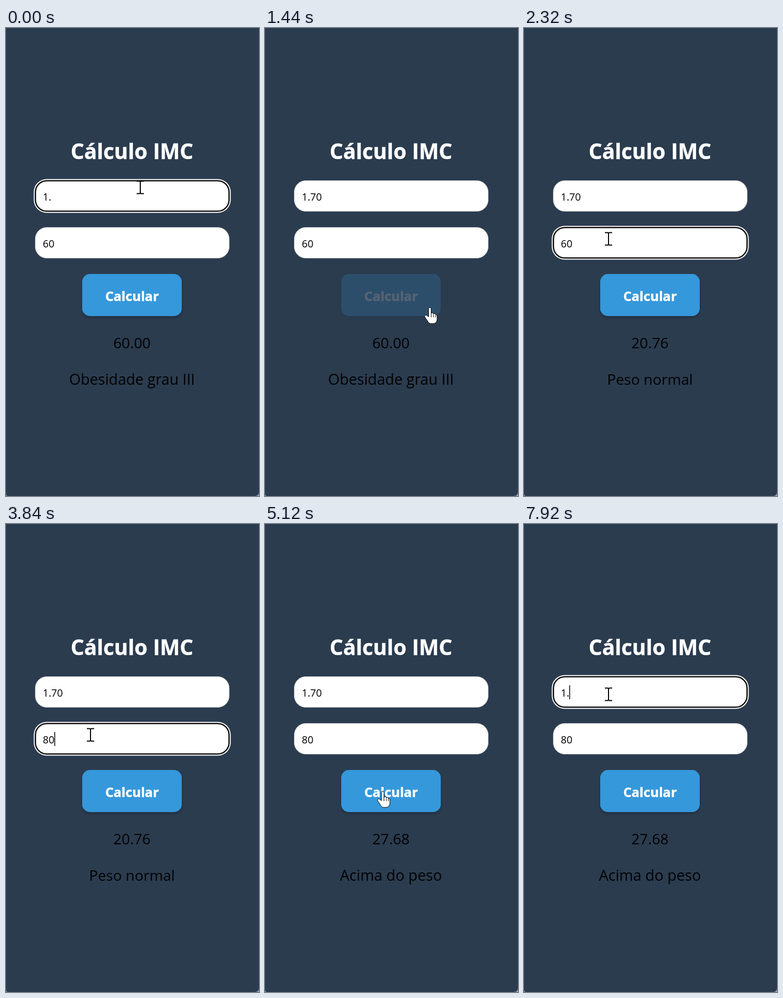
These frames come from a looping animation (488 px wide and 900 px high, 8000 ms). An HTML page:

```html
<!DOCTYPE html>
<html lang="pt">
<head>
<meta charset="utf-8">
<style>
  html, body { margin: 0; width: 100%; height: 100%; overflow: hidden; background: #2b3c4f; }
  svg { display: block; width: 100%; height: 100%; font-family: "Open Sans", "Noto Sans", sans-serif; }
  .mid { text-anchor: middle; }
  .bold { font-weight: 700; fill: #fff; stroke: #fff; stroke-width: .5; }
  .entry { font-size: 19.5px; }
  .pointer { fill: #fff; stroke: #000; stroke-linejoin: round; }
</style>
</head>
<body>
<svg viewBox="0 0 488 900">
  <defs>
    <filter id="shade" x="-10%" y="-20%" width="120%" height="140%">
      <feDropShadow dx="0" dy="3" stdDeviation="2.9" flood-opacity=".25"/>
    </filter>
    <g id="box">
      <rect x="56.5" y=".5" width="374" height="59" rx="22" fill="#fff" stroke="#ccc"/>
    </g>
  </defs>
  <path d="M488 892V900H480Q488 900 488 892ZM0 896V900H4Q0 900 0 896Z" fill="#a0a6ad"/>

  <text class="mid bold" x="243" y="252" font-size="40.7">Cálculo IMC</text>
  <use href="#box" y="293"/>
  <use href="#box" y="383"/>
  <g id="ring">
    <rect x="53.5" y="-2.5" width="380" height="65" rx="25" fill="#fff"/>
    <rect x="56.75" y=".75" width="373.5" height="58.5" rx="21.8" fill="#fff" stroke="#101010" stroke-width="2.6"/>
  </g>
  <text class="entry" id="height" x="71" y="332"></text>
  <text class="entry" id="weight" x="71" y="422"></text>
  <rect id="caret" width="1.5" height="27"/>

  <g id="button">
    <rect x="147" y="473" width="192" height="81" rx="15" fill="#3498db" filter="url(#shade)"/>
    <text class="mid bold" x="243" y="525" font-size="25.3">Calcular</text>
  </g>
  <text class="mid" id="value" x="243" y="616" font-size="28.2"></text>
  <text class="mid" id="label" x="243" y="686"></text>

  <g id="cursor">
    <path id="beam" d="M-7-11.5H-2Q0-11.5 0-9.5Q0-11.5 2-11.5H7M0-10V11M-7 12.5H-2Q0 12.5 0 10.5Q0 12.5 2 12.5H7" fill="none" stroke="#000" stroke-width="2"/>
    <g id="hand" class="pointer">
      <path d="M-2.5 18V2.5a2.5 2.5 0 0 1 5 0V12a2 2 0 0 1 4.5 1a2 2 0 0 1 4 1.5a1.8 1.8 0 0 1 3 1.5V22c0 5-3 9-8 9h-3c-4 0-6-2-8-6l-5-7c-1-2 2-4.5 4.5-2.5z"/>
      <path d="M2.5 12v7M7 14v5M11 15v4" fill="none"/>
    </g>
    <path id="arrow" class="pointer" d="M0 0V24L5.5 19L9 27L13 25.3L9.5 17.5H17Z"/>
  </g>
</svg>
<script>
const LOOP = 8000, BLINK = 500, DIM = 0.2;
const el = {};
document.querySelectorAll("[id]").forEach(node => el[node.id] = node);

// Each list holds [time, ...values]; the last entry reached applies.
const heights = [[0, "1."], [240, "1.7"], [480, "1.70"], [5760, "1.7"], [5840, "1."], [5920, "1"], [7600, "1."]];
const weights = [[0, "60"], [2800, "6"], [2960, ""], [3360, "8"], [3520, "80"]];
const focus = [[0, "height"], [1240, ""], [1960, "weight"], [4640, ""], [5680, "height"]];
const results = [
  [0, "60.00", "Obesidade grau III", 28.6],
  [1480, "20.76", "Peso normal", 28.2],
  [4800, "27.68", "Acima do peso", 28.8]
];
const presses = [[1240, 1480], [4640, 4800]];
const keys = [-560, 240, 480, 1800, 2800, 2960, 3360, 3520, 5680, 5760, 5840, 5920, 7600];

// Pointer moves: start, end, target x, target y
const moves = [
  [0, 0, 259, 306], [720, 1200, 318, 537.5], [1720, 1960, 163, 405],
  [4080, 4560, 227, 514], [5360, 5680, 163, 327]
];

const clamp = v => Math.min(1, Math.max(0, v));
const ease = v => v * v * (3 - 2 * v);
const at = (list, t) => list.filter(e => e[0] <= t).pop();
const show = (node, on) => node.setAttribute("visibility", on ? "visible" : "hidden");

function pointer(t) {
  let [, , x, y] = moves[0];
  for (const [start, end, tx, ty] of moves.slice(1)) {
    const k = ease(clamp((t - start) / (end - start)));
    x += (tx - x) * k;
    y += (ty - y) * k;
  }
  return [x, y];
}

function buttonOpacity(t) {
  let dim = 0;
  for (const [down, up] of presses)
    dim += ease(clamp((t - down) / 150)) * (1 - ease(clamp((t - up) / 250)));
  return 1 - dim * (1 - DIM);
}

function drawCursor(t) {
  const [x, y] = pointer(t);
  const inside = (l, top, r, b) => x >= l && x <= r && y >= top && y <= b;
  const field = inside(56, 293, 431, 353) || inside(56, 383, 431, 443);
  const button = inside(147, 473, 339, 554);
  el.cursor.setAttribute("transform", `translate(${x} ${y})`);
  show(el.beam, field);
  show(el.hand, button);
  show(el.arrow, !field && !button);
}

function draw(t) {
  el.height.textContent = at(heights, t)[1];
  el.weight.textContent = at(weights, t)[1];
  const [, value, label, size] = at(results, t);
  el.value.textContent = value;
  el.label.textContent = label;
  el.label.setAttribute("font-size", size);
  el.button.setAttribute("opacity", buttonOpacity(t));

  const name = at(focus, t)[1];
  const lastKey = keys.filter(k => k <= t).pop();
  show(el.ring, name);
  show(el.caret, name && Math.floor((t - lastKey) / BLINK) % 2 === 0);
  if (name) {
    const top = name === "height" ? 293 : 383;
    const width = el[name].textContent ? el[name].getComputedTextLength() : 0;
    el.ring.setAttribute("transform", `translate(0 ${top})`);
    el.caret.setAttribute("x", 71 + width);
    el.caret.setAttribute("y", top + 17);
  }
  drawCursor(t);
}

const begin = performance.now();
function tick() {
  draw((performance.now() - begin) % LOOP);
  requestAnimationFrame(tick);
}
tick();
</script>
</body>
</html>
```
